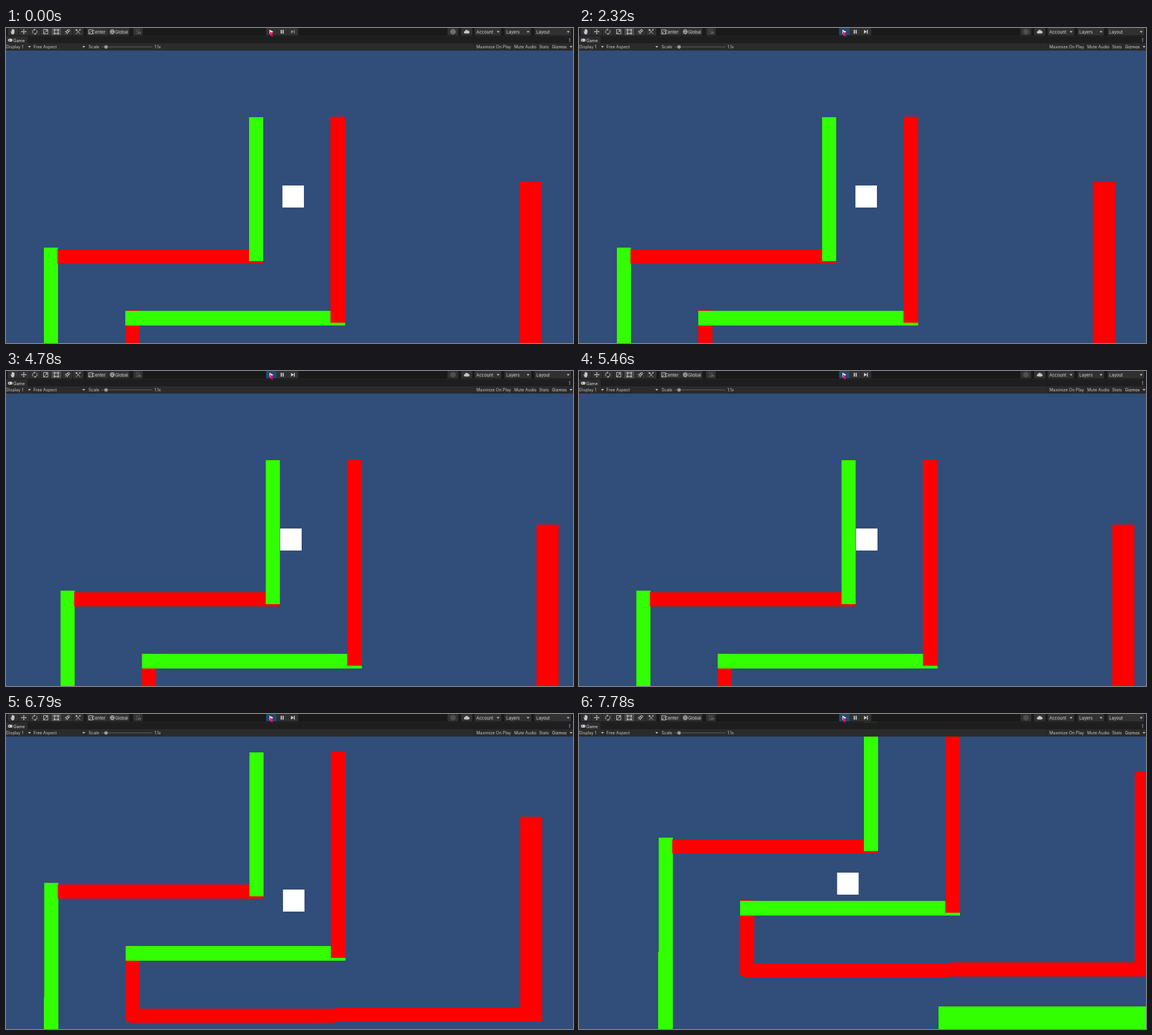
These frames come from a looping animation (1003x558 px, 8000 ms). An HTML page:

```html
<!DOCTYPE html>
<html lang="en">
<head>
<meta charset="utf-8">
<title>Game view</title>
<style>
  html, body { margin: 0; width: 100%; height: 100%; overflow: hidden; background: #314d79; }
  svg { display: block; width: 1003px; height: 558px; }
  text { font: 7.3px Inter, "Open Sans", sans-serif; fill: #c6c6c6; }
  .top text { font-size: 7.6px; fill: #d4d4d4; }
  .r { fill: #f00; }
  .g { fill: #32ff00; }
  .btn { fill: #313131; }
  .line { fill: none; stroke: #c4c4c4; stroke-width: 1; }
  .fill { fill: #c4c4c4; }
  .level, .player, .play, .gear, .step { animation: 8s step-end infinite; }
  .level { animation-name: camera; }
  .player { animation-name: player; fill: #fff; }
  .play { animation-name: play; }
  .gear { animation-name: gear; }
  .step { animation-name: step; }

  @keyframes camera {
    0% { transform: translate(0, 0); }
    51.25% { transform: translate(.4px, 0); }
    55.375% { transform: translate(17.5px, 0); }
    59.75% { transform: translate(29.5px, 0); }
    64% { transform: translate(33.7px, 0); }
    68.25% { transform: translate(34.4px, 0); }
    72.375% { transform: translate(34.2px, -24px); }
    76.625% { transform: translate(16.5px, -28.8px); }
    80.75% { transform: translate(3.5px, -47px); }
    84.875% { transform: translate(.6px, -90px); }
    89% { transform: translate(.4px, -141px); }
    93.25% { transform: translate(28px, -164px); }
    97.25%, 100% { transform: translate(74px, -170px); }
  }
  @keyframes player {
    0% { transform: translate(489px, 279px); }
    51.25% { transform: translate(486px, 279px); }
    55.375% { transform: translate(473px, 279px); }
    59.75% { transform: translate(485px, 279px); }
    64% { transform: translate(489px, 279px); }
    68.25% { transform: translate(490px, 279px); }
    72.375% { transform: translate(490px, 295px); }
    76.625% { transform: translate(506px, 272px); }
    80.75% { transform: translate(493px, 310px); }
    84.875% { transform: translate(490px, 311px); }
    89% { transform: translate(478px, 309px); }
    93.25% { transform: translate(457px, 287px); }
    97.25%, 100% { transform: translate(456.6px, 281px); }
  }
  @keyframes play {
    0% { fill: #313131; }
    4.125%, 100% { fill: #24486b; }
  }
  @keyframes gear {
    0% { opacity: 1; }
    8.125%, 100% { opacity: .5; }
  }
  @keyframes step {
    0% { opacity: .5; }
    29%, 100% { opacity: 1; }
  }
</style>
</head>
<body>
<svg viewBox="0 0 1003 558">
  <defs>
    <path id="caret" d="M0 0h5l-2.5 3z" fill="#c4c4c4"/>
    <path id="arrows" d="M0-4.8l1.7 2H-1.7zM0 4.8l1.7-2H-1.7zM-4.8 0l2-1.7v3.4zM4.8 0l-2-1.7v3.4z"/>
  </defs>

  <rect width="1003" height="558" fill="#314d79"/>

  <g class="level" shape-rendering="crispEdges">
    <rect class="g" x="66.5" y="388.5" width="25" height="204"/>
    <rect class="g" x="66" y="592" width="25.5" height="170"/>
    <rect class="r" x="90.5" y="391.5" width="364" height="25"/>
    <rect class="g" x="430" y="157.5" width="24.8" height="255.5"/>
    <rect class="r" x="210.5" y="499.5" width="25" height="134.3"/>
    <rect class="r" x="217" y="611.5" width="364" height="25.3"/>
    <rect class="r" x="580.5" y="609.5" width="367" height="25.8"/>
    <rect class="g" x="210.5" y="501" width="389" height="25.7"/>
    <rect class="r" x="574" y="157" width="25.6" height="364.5"/>
    <rect class="r" x="909.2" y="271.6" width="38.4" height="363.7"/>
    <rect class="g" x="562" y="688" width="540" height="90"/>
  </g>
  <rect class="player" width="38.4" height="38.5" shape-rendering="crispEdges"/>

  <!-- window bars -->
  <rect width="1003" height="14.5" fill="#191919"/>
  <rect y="14.5" width="1003" height="12.5" fill="#1e1e1e"/>
  <rect y="15" width="38" height="12" fill="#2c2c2c"/>
  <rect y="27" width="1003" height="13" fill="#2b2b2b"/>

  <g class="top">
    <g class="btn">
      <rect x="3" y="0" width="134" height="13" rx="1.5"/>
      <rect x="143" y="0" width="75" height="13" rx="1.5"/>
      <rect x="225" y="0" width="17" height="13" rx="1.5"/>
      <rect x="479.5" y="0" width="18.5" height="13"/>
      <rect x="498.5" y="0" width="18.5" height="13" rx="1.5"/>
      <rect x="781" y="0" width="19" height="13" rx="1.5"/>
      <rect x="805" y="0" width="20" height="13" rx="1.5"/>
      <rect x="829" y="0" width="47" height="13" rx="1.5"/>
      <rect x="882" y="0" width="47" height="13" rx="1.5"/>
      <rect x="935" y="0" width="65" height="13" rx="1.5"/>
    </g>
    <rect class="play" x="460" y="0" width="19" height="13" rx="1.5"/>
    <rect x="80" y="0" width="18.5" height="13" fill="#4c4c4c"/>
    <path d="M22.3 0v13M41.5 0v13M60.7 0v13M79.7 0v13M98.7 0v13M118 0v13M181 0v13" stroke="#1d1d1d" fill="none"/>

    <!-- hand, move, rotate, scale, rect, transform, custom -->
    <path class="fill" d="M8 6l1-.4 1 1.4V2.6h1V5.6V1.8h1.1v3.8V2h1.1v3.8V3h1l.8 0v5l-1.5 3.2h-3.3z"/>
    <g transform="translate(31.5 6.5)"><use href="#arrows" class="fill"/><path class="line" d="M-4 0h8M0-4v8"/></g>
    <path class="line" d="M48 9.5a4 4 0 0 1 2.2-6.7M54 3.8a4 4 0 0 1-2.4 6.6"/>
    <path class="fill" d="M49.8 1l2.6 1.8-2.6 1.7zM52 8.7v3.5l-2.6-1.8z"/>
    <path class="line" d="M66.5 2.5h7.5v8h-7.5zM67 10l5-5.5"/>
    <path class="fill" d="M70 3.7h3v3z"/>
    <path class="line" d="M85.8 3.3h6.5v6.5h-6.5z"/>
    <path class="fill" d="M84.5 2h2.4v2.4h-2.4zM91.2 2h2.4v2.4h-2.4zM84.5 8.7h2.4v2.4h-2.4zM91.2 8.7h2.4v2.4h-2.4z"/>
    <g class="line" transform="translate(108.5 6.5)"><circle r="2.2"/><circle cx="2.2" cy="-2" r="2"/><path d="M-4.3 0h3M0 4.3v-3M-3.5 4l2-2"/></g>
    <path class="line" stroke-width="1.4" d="M124 10.5l7-7.5M124 3l7.3 7.5"/>
    <path class="fill" d="M122.8 3.5l2-1.8 1.8 1.8-2 1.9zM129 2l2.8 0v2.7z"/>

    <path class="line" d="M146.5 3h7v7.5h-7zM146.5 10.5l5-5.5"/>
    <text x="152" y="9.6">Center</text>
    <circle class="line" cx="188" cy="6.6" r="3.7"/>
    <path class="line" stroke-width=".7" d="M184.3 6.6h7.4M188 3q-3.4 3.6 0 7.3M188 3q3.4 3.6 0 7.3"/>
    <text x="193" y="9.6">Global</text>
    <path d="M230 3.3h7M230 6.5h4M230 9.7h4" fill="none" stroke="#8a8a8a" stroke-dasharray="1.3 1.3"/>
    <path d="M235 10.5V8a1.3 1.3 0 0 1 2.6 0v2.5" fill="none" stroke="#8a8a8a"/>

    <path d="M466 3l7 3.8-7 3.8z" fill="#eee"/>
    <path d="M486 3.2h1.8v6.8H486zM489.4 3.2h1.8v6.8h-1.8z" fill="#ddd"/>
    <path class="step" d="M504.3 3.2l4.6 3.4-4.6 3.4zM509.3 3.2h1.5v6.8h-1.5z" fill="#ddd"/>
    <g class="gear line" transform="translate(790.6 6.6)">
      <path d="M0-4.2l3.7 2.1v4.2L0 4.2l-3.7-2.1v-4.2z"/>
      <circle r="1.6"/>
    </g>
    <path class="fill" d="M812 9.7a2.1 2.1 0 0 1 0-4.2 3 3 0 0 1 5.6-.4 2.3 2.3 0 0 1 .3 4.6z"/>
    <text x="832" y="9.6">Account</text>
    <text x="885" y="9.6">Layers</text>
    <text x="938" y="9.6">Layout</text>
    <use href="#caret" x="868" y="5.4"/>
    <use href="#caret" x="921" y="5.4"/>
    <use href="#caret" x="992" y="5.4"/>
  </g>

  <rect x="3.5" y="19" width="8" height="5" rx="2.5" fill="#ddd"/>
  <path d="M4.8 21.5h2.4M6 20.3v2.4M9 21.5h1.3" stroke="#222" stroke-width=".8"/>
  <text x="13" y="24.5" style="fill:#ddd">Game</text>
  <path class="fill" d="M996.3 18h1.4v1.4h-1.4zM996.3 20.6h1.4v1.4h-1.4zM996.3 23.2h1.4v1.4h-1.4z"/>

  <text x="0.5" y="36.2">Display 1</text>
  <use href="#caret" x="39" y="32"/>
  <text x="48.5" y="36.2">Free Aspect</text>
  <use href="#caret" x="135" y="32"/>
  <text x="146" y="36.2">Scale</text>
  <path d="M169 33.5h90" stroke="#626262"/>
  <circle cx="177" cy="33.5" r="3.1" fill="#999"/>
  <text x="262.5" y="36.2">1.1x</text>
  <text x="832" y="36.2">Maximize On Play</text>
  <text x="899" y="36.2">Mute Audio</text>
  <text x="943" y="36.2">Stats</text>
  <text x="966" y="36.2" style="fill:#ddd">Gizmos</text>
  <use href="#caret" x="997" y="32"/>
  <path d="M46 27v13M143 27v13M829 27v13M895.5 27v13M940.5 27v13M963 27v13M995 27v13" stroke="#222" stroke-width=".8"/>

  <path d="M467 5.5l6 5.8-2.6.2 1.5 3.4-1.5.7-1.5-3.4-1.9 1.8z" fill="#ff0f6e"/>
</svg>
</body>
</html>
```
